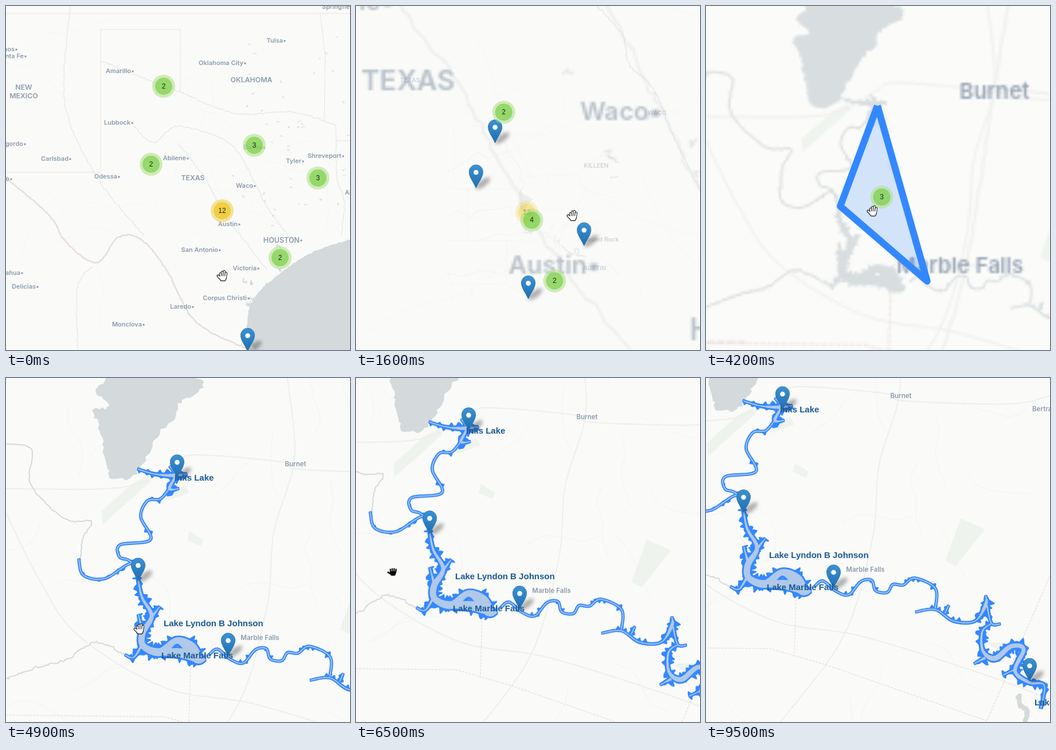
Animation, 600 px wide and 600 px high, one loop 10 s. Source, as an HTML page with a canvas:

```html
<!DOCTYPE html>
<html lang="en">
<head>
<meta charset="utf-8">
<title>Clustered lake map</title>
<style>
html, body { margin: 0; width: 100%; height: 100%; overflow: hidden; background: #fafaf8; }
canvas { display: block; }
</style>
</head>
<body>
<canvas id="map" width="600" height="600"></canvas>
<script>
const SIZE = 600, LOOP = 10000, TICK = 100;
const LAND = '#fafaf8', WATER = '#d4dadc', ROAD = '#eeeeec', LANE = '#f2f2f0', PARK = '#eef3ee',
      BORDER = '#ead6d7', INK = '#8d9bad', BLUE = '#3388ff';
const SANS = '"Liberation Sans", Arial, sans-serif';
const ctx = document.getElementById('map').getContext('2d');

let seed = 1;
const random = () => (seed = seed * 16807 % 2147483647) / 2147483647;
const spread = size => (random() - .5) * 2 * size;
const points = text => text.split(' ').map(p => p.split(',').map(Number));

// ---- geometry helpers ----
// Catmull-Rom curve through all coordinates, widths included.
function smooth(pts, step = 4) {
  const out = [];
  for (let i = 0; i < pts.length - 1; i++) {
    const a = pts[i], b = pts[i + 1], before = pts[i - 1] || a, after = pts[i + 2] || b;
    const n = Math.ceil(Math.hypot(b[0] - a[0], b[1] - a[1]) / step);
    for (let k = 0; k < n; k++) {
      const u = k / n, v = 1 - u;
      out.push(a.map((p, d) => v * v * (1 + 2 * u) * p + u * u * (3 - 2 * u) * b[d]
        + u * v * (v * (b[d] - before[d]) - u * (after[d] - p)) / 2));
    }
  }
  return [...out, pts[pts.length - 1]];
}

function trace(c, pts, close) {
  c.beginPath();
  pts.forEach(p => c.lineTo(p[0], p[1]));
  if (close) c.closePath();
}

function stroke(c, pts, color, width) {
  trace(c, pts);
  c.strokeStyle = color;
  c.lineWidth = width;
  c.stroke();
}

function fill(c, pts, color) {
  trace(c, pts, true);
  c.fillStyle = color;
  c.fill();
}

const jitter = (pts, amp) => pts.map(([x, y]) => [x + spread(amp), y + spread(amp)]);
const stream = (c, text, color, width, amp = 1) => stroke(c, jitter(smooth(points(text)), amp), color, width);

function border(c, text, width, dash = []) {
  c.setLineDash(dash);
  stroke(c, points(text), BORDER, width);
  c.setLineDash([]);
}

function wander(c, count, w, h, color, width) {
  for (let i = 0; i < count; i++) {
    let x = random() * w, y = random() * h, heading = random() * 6.3;
    const path = Array.from({ length: 5 }, () => {
      heading += spread(.7);
      return [x += 32 * Math.cos(heading), y += 32 * Math.sin(heading)];
    });
    stroke(c, smooth(path), color, width);
  }
}

function ponds(c, count, x, y, w, h, size) {
  for (let i = 0; i < count; i++) {
    const px = x + random() * w, py = y + random() * h;
    stroke(c, jitter(Array.from({ length: 5 }, (_, k) => [px + k * size / 3, py]), size), WATER, size * .5);
  }
}

// Closed outline around a centre line of [x, y, width]; ragged shores get coves.
function ribbon(mid, inset, ragged) {
  const left = [], right = [];
  mid.forEach(([x, y, w], i) => {
    const a = mid[Math.max(i - 1, 0)], b = mid[Math.min(i + 1, mid.length - 1)];
    const dx = b[0] - a[0], dy = b[1] - a[1], len = Math.hypot(dx, dy) || 1;
    const half = () => Math.max(w / 2 - inset, .9)
      + (ragged && random() < (w > 4.5 ? .4 : .08) ? random() * Math.min(w + 2, 9) : 0);
    const l = half(), r = half();
    left.push([x + dy / len * l, y - dx / len * l]);
    right.unshift([x - dy / len * r, y + dx / len * r]);
  });
  return left.concat(right);
}

function write(c, text, x, y, size, align = 'center') {
  c.font = `600 ${size}px Inter, sans-serif`;
  c.textAlign = align;
  c.textBaseline = 'middle';
  c.fillStyle = INK;
  c.fillText(text, x, y);
}

function layer(w, h, offset, paint) {
  const canvas = document.createElement('canvas'), c = canvas.getContext('2d');
  canvas.width = w;
  canvas.height = h;
  c.translate(offset, offset);
  c.lineJoin = c.lineCap = 'round';
  seed = 77;
  paint(c);
  return canvas;
}

// ---- lakes: centre lines in close-up pixels, width carried forward ----
function lake(text) {
  let width = 3;
  const mid = smooth(points(text).map(([x, y, w]) => [x, y, width = w || width]), 3);
  return { shore: ribbon(mid, 0, true), open: ribbon(mid, 1.5, false) };
}

const inksLake = [
  '173,109,3 205,118,5 240,120,9 258,117,3', '229,104,3 238,120,6 228,143,8 244,143,3',
  '228,143,4 212,161,3 190,164 178,192 195,232 142,241 141,262 157,268 173,283'
];
const johnsonLake = [
  '70,266,3 78,294 115,300 160,274 173,298,5',
  '173,298,5 180,332,7 197,365,10 181,395,14 183,418,14 212,428,17 240,408,14 264,420,24 278,440,20 291,441,5',
  '205,428,12 250,430,20 278,440,16', '197,367,8 211,349,4', '181,390,8 174,363,4', '182,412,8 166,437,5 151,433,3'
];
const marbleFalls = ['298,432,3 312,423 335,441 357,447 378,424 397,422 404,440 424,443 434,429 452,430 472,418 508,436 508,471'];
const travisLake = [
  '474,477,3 508,473 540,493,4 577,493 596,464,9 596,449,3', '525,479,5 531,466,3', '598,466,6 606,497,4 621,498,3',
  '606,497,4 590,511,6 591,545,8 612,558,12 640,537,11 662,542,10 647,580,9 672,600,8 698,605,5 692,645,5',
  '595,557,8 576,567,3', '650,576,6 626,587,3'
];
const lakes = [inksLake, johnsonLake, marbleFalls, travisLake].flat().map(lake);

// Land around the lakes; weight thickens the lines for the smaller scale.
function terrain(c, weight) {
  ['110,182 165,133 190,121 196,130 140,180 112,205', '263,217 287,232 283,243 259,233', '552,314 595,333 543,397 526,388',
   '225,150 255,137 262,150 220,165', '595,530 650,530 625,548'].forEach(p => fill(c, points(p), PARK));
  ['-57,143 120,143 190,128 240,98 275,84 420,96 455,109 638,114 710,99', '434,-50 446,90 410,220 398,350 348,519 238,669',
   '-57,185 0,300 70,400 220,490 378,519 578,581 708,629'].forEach(r => stream(c, r, ROAD, weight, .3));
  if (weight < 3) wander(c, 24, 650, 640, LANE, 1);
  ['-57,538 220,541 320,570 598,667 708,414', '265,450 262,555']
    .forEach(b => border(c, b, weight * .55, [weight * 1.5, weight * 1.5]));
  stream(c, '-57,65 -12,75 -14,135 45,195 91,200 77,230 73,268', WATER, weight);
  stream(c, '-57,475 0,454 50,440 98,411 150,432', WATER, weight, 2);
  const reservoir = points('114,-180 94,-105 118,-50 100,-30 122,0 95,5 108,42 119,100 128,125 165,122 183,98 215,40 240,18 244,-4 288,-39 210,-85 155,-115');
  fill(c, jitter(smooth([...reservoir, reservoir[0]], 6), 3), WATER);
  lakes.forEach(l => fill(c, l.shore, WATER));
  stream(c, '653,624 657,640 668,649 664,669', WATER, 8, 2);
}

const nearMap = layer(800, 740, 60, c => {
  terrain(c, 2);
  write(c, 'Burnet', 448, 101, 11.5);
  write(c, 'Marble Falls', 386, 404, 11.5);
  write(c, 'Bertram', 677, 124, 11.5, 'left');
});

const lakeOverlay = layer(800, 740, 60, c => {
  lakes.forEach(({ shore }) => {
    fill(c, shore, BLUE);
    stroke(c, [...shore, shore[0]], BLUE, 2.8);
  });
  lakes.forEach(({ open }) => fill(c, open, '#b0c8e9'));
});

// ---- county scale ----
function county(c) {
  ['360,0 358,165 341,290 320,400 270,500 250,600', '0,20 130,80 218,92 358,165 458,160 600,120',
   '0,345 165,300 190,240 165,180 190,60', '600,0 545,140 580,230 525,420 480,600', '0,590 106,496 280,495 400,530 600,500',
   '341,290 404,305 480,375 545,460 590,600', '600,330 500,345'].forEach(r => stream(c, r, ROAD, 1.2, .3));
  ['27,0 27,221 270,220', '0,213 27,214', '74,224 74,401', '0,401 232,401', '210,401 210,553 290,600', '0,554 210,553',
   '89,554 89,600', '265,177 458,172 487,226 445,300 376,430 290,600', '218,92 360,0', '458,158 600,70', '487,226 600,255',
   '400,350 440,347 470,380 520,395'].forEach(b => border(c, b, .9, [2.5, 2]));
  ['85,0 140,8 165,45 205,60 215,92 262,155 255,180 271,200 265,222', '0,165 60,130 112,95 145,112 215,92',
   '0,322 40,298 80,320 110,300 190,290 215,283', '100,405 130,395 190,379 215,386',
   '0,512 60,525 130,505 190,517 240,488 300,497 340,472 400,440', '480,456 545,500 565,480 600,520']
    .forEach(r => stream(c, r, WATER, 1.3, 2));
  ['572,182 600,178', '565,105 600,130', '408,425 440,450 452,430 465,438 455,450 480,456']
    .forEach(r => stream(c, r, WATER, 5, 3));
  c.save();
  c.transform(.25, 0, 0, .25, 229.5, 267);
  terrain(c, 4);
  c.restore();
}

const countyMap = layer(SIZE, SIZE, 0, c => {
  county(c);
  [['KILLEEN', 523, 139, 13], ['AUSTIN', 517, 498, 13], ['Round Rock', 541, 398, 11]].forEach(l => write(c, ...l));
  [['Gatesville', 517, 4], ['Harker Heights', 548, 154], ['Jarrell', 568, 263], ['Georgetown', 542, 345], ['Leander', 481, 376],
   ['Pflugerville', 563, 427], ['Manor', 586, 468], ['Lakeway', 429, 458], ['Dripping', 393, 527], ['Springs', 393, 537],
   ['Burnet', 341, 292], ['Bertram', 404, 298], ['Marble Falls', 326, 368], ['Llano', 178, 291], ['Fredericksburg', 106, 496],
   ['Johnson City', 274, 495], ['Blanco', 271, 570], ['Kerrville', 7, 591]].forEach(([name, x, y]) => write(c, name, x, y, 9.5));
});

// ---- regional scale ----
const regionMap = layer(SIZE, SIZE, 0, c => {
  wander(c, 12, SIZE, SIZE, LANE, 1);
  stream(c, '420,0 465,50 475,100 520,145 550,220 600,320', WATER, 2, 2);
  c.save();
  c.transform(.5, 0, 0, .5, 157.5, 208.5);
  county(c);
  c.restore();
  [['KILLEEN', 419, 279], ['WACO', 525, 187], ['AUSTIN', 416, 458], ['Round Rock', 428, 408], ['TEXAS', 94, 130]]
    .forEach(([name, x, y]) => write(c, name, x, y, 10.5));
});

// ---- state scale ----
const stateMap = layer(SIZE, SIZE, 0, c => {
  wander(c, 34, SIZE, SIZE, '#f5f5f4', 1);
  ponds(c, 45, 390, 40, 210, 350, 2);
  fill(c, [...jitter(smooth(points('600,407 545,425 505,447 450,490 425,525 421,570 433,600')), .8), [600, 600]], WATER);
  ponds(c, 6, 415, 475, 40, 70, 4);
  ponds(c, 5, 470, 415, 70, 50, 4);
  ['0,13 600,13', '165,41 165,290 0,290', '165,41 304,41 304,150', '548,13 557,90 555,200', '575,207 576,235 600,235']
    .forEach(b => border(c, b, .7));
  const rioGrande = '0,300 75,365 105,412 158,448 195,404 235,407 280,460 330,550 420,598';
  stream(c, rioGrande, '#e3dfe1', 2.4);
  stream(c, rioGrande, '#eed9da', 1);
  ['304,150 400,187 500,185 575,207', '576,235 577,300 590,340 585,400', '125,600 125,490 150,455', '112,0 103,170 160,300 240,400',
   '220,205 257,238 300,210 390,240 436,312 453,347 500,412', '165,95 220,118 304,150', '300,240 345,297 385,368 455,460']
    .forEach(r => stream(c, r, '#e3e4e6', 1.1, 1.2));
  [['Tulsa', 486, 61], ['Oklahoma City', 417, 100], ['Amarillo', 221, 114], ['Lubbock', 220, 204], ['Carlsbad', 112, 267],
   ['Odessa', 197, 298], ['Abilene', 317, 266], ['Dallas', 450, 247], ['Tyler', 518, 271], ['Shreveport', 588, 262],
   ['Waco', 434, 314], ['Austin', 407, 381], ['San Antonio', 373, 426], ['Victoria', 440, 458], ['Corpus Christi', 423, 510],
   ['Laredo', 326, 525], ['Monclova', 240, 556], ['Delicias', 55, 490], ['Chihuahua', 28, 466], ['Alamogordo', 33, 241],
   ['Santa Fe', 34, 88], ['Los Alamos', 18, 76], ['El Paso', 9, 302], ['HOUSTON', 515, 409]].forEach(([name, x, y]) => {
    write(c, name, x - 3, y, name === 'HOUSTON' ? 12.5 : 11, 'right');
    c.fillRect(x - 1.5, y - 1.5, 3, 3);
  });
  [['TEXAS', 326, 300], ['OKLAHOMA', 428, 129], ['NEW', 31, 142], ['MEXICO', 31, 157]]
    .forEach(([name, x, y]) => write(c, name, x, y, 12.3));
  write(c, 'Springfield', 551, 2, 11, 'left');
  write(c, 'Alexandria', 591, 326, 11, 'left');
});

// ---- live parts ----
function disc(x, y, r, color) {
  ctx.beginPath();
  ctx.arc(x, y, r, 0, 7);
  ctx.fillStyle = color;
  ctx.fill();
}

function cluster([x, y], count, alpha = 1) {
  const rgb = count > 9 ? ['241,211,87', '240,194,12'] : ['181,226,140', '110,204,57'];
  ctx.globalAlpha = alpha;
  disc(x, y, 20, `rgba(${rgb[0]},.6)`);
  disc(x, y, 15, `rgba(${rgb[1]},.6)`);
  ctx.font = '12px ' + SANS;
  ctx.textAlign = 'center';
  ctx.textBaseline = 'middle';
  ctx.fillStyle = '#222';
  ctx.fillText(count, x, y + .5);
  ctx.globalAlpha = 1;
}

const pinShape = new Path2D('M0-41C-7-41-12-35.5-12-28.5-12-20-5-12 0-1 5-12 12-20 12-28.5 12-35.5 7-41 0-41Z');
function pin([x, y]) {
  ctx.save();
  ctx.translate(x, y);
  ctx.save();
  ctx.filter = 'blur(3px)';
  ctx.rotate(-.65);
  ctx.beginPath();
  ctx.ellipse(15, 0, 15, 6, 0, 0, 7);
  ctx.fillStyle = 'rgba(0,0,0,.3)';
  ctx.fill();
  ctx.restore();
  const shade = ctx.createLinearGradient(0, -41, 0, 0);
  shade.addColorStop(0, '#3b93d3');
  shade.addColorStop(1, '#1f6cb0');
  ctx.fillStyle = shade;
  ctx.fill(pinShape);
  ctx.strokeStyle = '#2e74ad';
  ctx.lineWidth = 1;
  ctx.stroke(pinShape);
  disc(0, -28, 4.3, '#fff');
  ctx.restore();
}

function hull(text, [s, x, y]) {
  ctx.save();
  ctx.translate(x, y);
  ctx.scale(s, s);
  ctx.lineJoin = 'round';
  const corners = points(text);
  fill(ctx, corners, 'rgba(51,136,255,.2)');
  stroke(ctx, [...corners, corners[0]], BLUE, 3);
  ctx.restore();
}

const fingertips = { open: [-4, -7, -8, -5], grab: [-3, -4, -4, -3], point: [-8, -2, -2, -1] };
function hand([x, y], kind) {
  const [edge, body] = kind === 'open' ? ['#111', '#fff'] : ['#e8e8e8', '#0a0a0a'];
  ctx.save();
  ctx.translate(x, y);
  ctx.lineCap = ctx.lineJoin = 'round';
  const palm = points('-2,2 5,2 4,6 -1,6 -2,2');
  const thumb = [[-7, kind === 'grab' ? 2 : 0], [-2, 5]];
  stroke(ctx, palm, edge, 6);
  stroke(ctx, thumb, edge, 5);
  fingertips[kind].forEach((top, i) => {
    const finger = [[-3 + i * 3.3, top], [-2 + i * 2.6, 3]];
    stroke(ctx, finger, edge, 4.4);
    stroke(ctx, finger, body, 2.4);
  });
  stroke(ctx, thumb, body, 2.6);
  stroke(ctx, palm, body, 3.6);
  fill(ctx, palm, body);
  ctx.restore();
}

function popup(x, y, alpha) {
  ctx.save();
  ctx.globalAlpha = alpha;
  ctx.translate(x, y);
  ctx.shadowColor = 'rgba(0,0,0,.4)';
  ctx.shadowBlur = 14;
  ctx.shadowOffsetY = 3;
  ctx.fillStyle = '#fff';
  ctx.beginPath();
  ctx.roundRect(-68, -67, 136, 47, 12);
  ctx.moveTo(-15, -20);
  ctx.lineTo(0, -1);
  ctx.lineTo(15, -20);
  ctx.fill();
  ctx.shadowColor = 'transparent';
  ctx.font = '12px ' + SANS;
  ctx.textAlign = 'left';
  ctx.textBaseline = 'middle';
  ctx.fillStyle = '#333';
  ctx.fillText('Lake Marble Falls', -49, -43);
  ctx.fillStyle = '#c3c3c3';
  ctx.fillText('×', 55, -58);
  ctx.restore();
}

// ---- timing ----
const ramp = (t, from, to) => Math.min(1, Math.max(0, (t - from) / (to - from)));
const easeOut = (t, from, to) => 1 - (1 - ramp(t, from, to)) ** 3;
const between = (a, b, p) => a.map((v, i) => v + (b[i] - v) * p);

// Moves are [from, to, x, y]; the position rests in between.
const follow = (origin, moves, t) =>
  moves.reduce((pos, [from, to, x, y]) => between(pos, [x, y], ramp(t, from, to)), origin);

const cursorMoves = [[200, 900, 377, 366], [1600, 1900, 325, 427], [2000, 2300, 316, 380], [3300, 3800, 290, 358],
  [4800, 4900, 232, 438], [5100, 5200, 212, 435], [5400, 5500, 188, 429], [5900, 6000, 108, 369], [6000, 6700, 45, 324],
  [6900, 7000, 160, 382], [7000, 7200, 130, 366], [7300, 7600, 148, 351], [7800, 7900, 228, 344], [8100, 8200, 220, 344],
  [8800, 8900, 227, 232], [9100, 9200, 14, -4], [9400, 9500, 14, -40]];
const panMoves = [[5900, 6000, 0, 0], [6000, 6700, -63, -45], [6900, 7200, -108, -69]];

const HOME = [1, 0, 0];
const project = ([s, ox, oy], x, y) => [x * s + ox, y * s + oy];
const show = (image, [s, x, y]) => ctx.drawImage(image, x, y, image.width * s, image.height * s);

function fadeOver(image, view, alpha) {
  ctx.globalAlpha = alpha;
  ctx.fillStyle = LAND;
  ctx.fillRect(0, 0, SIZE, SIZE);
  show(image, view);
  ctx.globalAlpha = 1;
}

function stateScene(t) {
  const view = between(HOME, [4, -1213, -1069], easeOut(t, 1100, 1500));
  show(stateMap, view);
  if (t < 1600) {
    if (t >= 800 && t < 1500) hull('334,336 358,268 427,386 402,418 380,432', view);
    [[275, 140, 2], [433, 243, 3], [253, 276, 2], [544, 300, 3], [478, 439, 2], [377, 357, 12]]
      .forEach(([x, y, n]) => cluster(project(view, x, y), n));
    pin(project(view, 421.5, 603));
    return;
  }
  fadeOver(regionMap, HOME, ramp(t, 1400, 1900));
  if (t >= 2200) hull('302,358 294,379 313,396 355,416', HOME);
  const p = easeOut(t, 1500, 1980), burst = (x, y) => between([297, 360], [x, y], p);
  if (p < 1) cluster([298, 360], 12, 1 - p);
  [[189, 121], [123, 277], [497, 477], [304, 661]].forEach(([x, y]) => pin(burst(x, y)));
  [[219, 13, 2], [395, 597, 2], [316, 387, 4]].forEach(([x, y, n]) => cluster(burst(x, y), n));
}

function countyScene(t) {
  const view = between(HOME, [4, -861, -1018], easeOut(t, 3900, 4200));
  show(countyMap, view);
  fadeOver(nearMap, [1, -3, -10], ramp(t, 4160, 4500));
  if (t >= 3700 && t < 4400) hull('290,298 273.8,341.8 311.7,374.5', view);
  if (t < 3400) cluster([317, 357], 4, .2);
  cluster(project(view, 291.9, 337.8), 3);
  pin(project(view, 396, 415));
}

function lakeScene(t) {
  const [x, y] = follow([57, 50], panMoves, t), view = [1, x - 60, y - 60], labelled = t >= 4900;
  show(nearMap, view);
  if (labelled) show(lakeOverlay, view);
  [[241.5, 125], [173.5, 305], [330.5, 436], [672.5, 599]].forEach(([px, py]) => pin([px + x, py + y]));
  if (labelled) {
    ctx.font = 'bold 15px ' + SANS;
    ctx.textAlign = 'left';
    ctx.textBaseline = 'alphabetic';
    ctx.fillStyle = '#1a5a90';
    [['Inks Lake', 237, 129], ['Lake Lyndon B Johnson', 218, 383], ['Lake Marble Falls', 214, 439], ['Lake Travis', 681, 640]]
      .forEach(([name, lx, ly]) => ctx.fillText(name, lx + x, ly + y));
  }
  if (t >= 7900 && t < 8900) popup(222, 326, t < 8500 ? 1 : .5);
}

function draw(t) {
  ctx.fillStyle = LAND;
  ctx.fillRect(0, 0, SIZE, SIZE);
  (t < 3300 ? stateScene : t < 4700 ? countyScene : lakeScene)(t);
  const dragging = t >= 6000 && t < 6700 || t >= 7000 && t < 7300;
  const pointing = t >= 7300 && t < 8900;
  hand(follow([377, 471], cursorMoves, t), dragging ? 'grab' : pointing ? 'point' : 'open');
}

const start = performance.now();
let shown = -1;
function frame() {
  const t = Math.floor((performance.now() - start) % LOOP / TICK) * TICK;
  if (t !== shown) draw(shown = t);
  requestAnimationFrame(frame);
}
frame();
</script>
</body>
</html>
```
